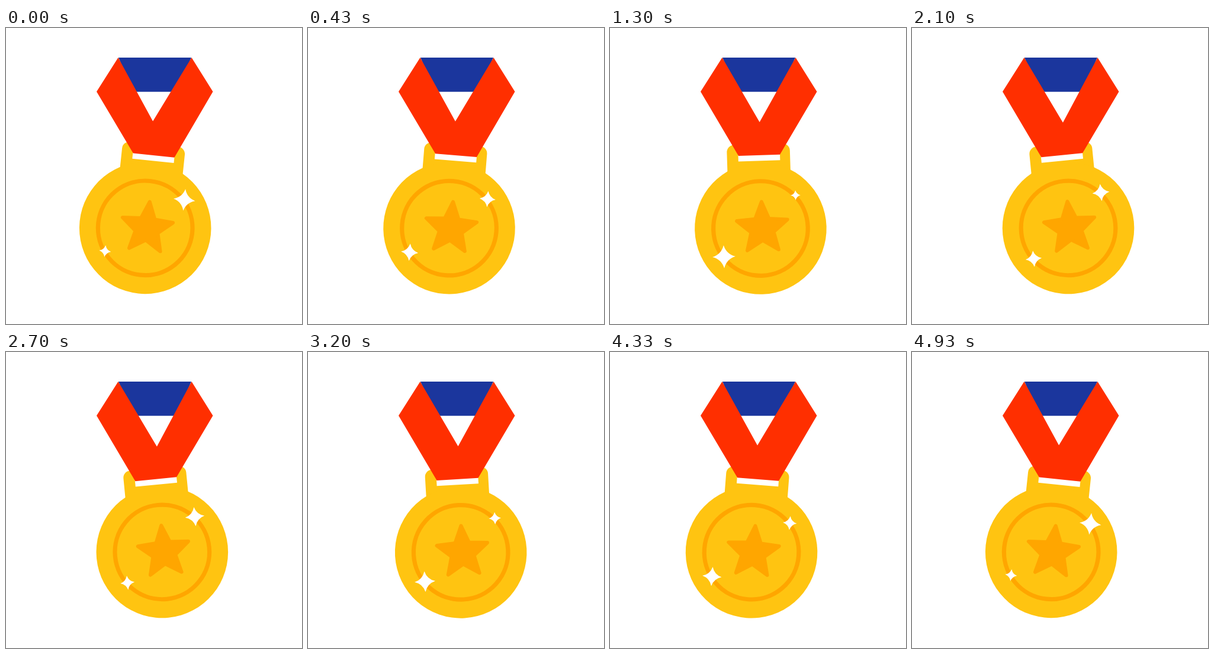
An HTML page that plays this animation: 500 by 500 pixels, repeating every 5.01 s.

```html
<!DOCTYPE html>
<html lang="en">
<head>
<meta charset="utf-8">
<title>Swinging medal</title>
<style>
  html, body { margin: 0; height: 100%; overflow: hidden; background: #fff; }
  svg { display: block; width: 100%; height: 100%; }
</style>
</head>
<body>
<svg viewBox="0 0 500 500">
  <defs>
    <path id="spark" fill="#fff" d="M0-1Q.22-.22 1 0Q.22.22 0 1Q-.22.22-1 0Q-.22-.22 0-1Z"/>
  </defs>
  <g id="medal">
    <rect x="197" y="196.5" width="106.5" height="70" rx="12" fill="#ffc411"/>
    <rect x="216" y="212" width="70.5" height="12.4" fill="#fff"/>
    <circle cx="250" cy="338.6" r="111.3" fill="#ffc411"/>
    <circle cx="250" cy="338.6" r="79.8" fill="none" stroke="#ffa600" stroke-width="7.2"/>
    <path id="star" transform="translate(252.9 338.8)" fill="#ffa600" stroke="#ffa600" stroke-width="6" stroke-linejoin="round"/>
    <use id="upper" href="#spark"/>
    <use id="lower" href="#spark"/>
  </g>
  <path d="M190 50H313L288 107.7H215Z" fill="#1b369d"/>
  <polygon id="ribbon" fill="#ff2f00"/>
</svg>
<script>
const $ = id => document.getElementById(id);
const LOOP = 5010, FRAMES = 99, TURN = 48;
const PIVOT = { x: 250, y: 197 }, SWING = 6;

const starPoints = Array.from({ length: 10 }, (_, i) => {
  const r = i % 2 ? 20 : 45, a = i * Math.PI / 5;
  return [r * Math.sin(a), -r * Math.cos(a)];
});
$('star').setAttribute('d', `M${starPoints.join('L')}Z`);

// Steps alternate between 30 ms and 70 ms
const stepAt = t => Math.min(FRAMES, 2 * Math.floor(t / 100) + (t % 100 >= 30 ? 1 : 0));

// -1 is the far left, 1 the far right; the way out is a little quicker at first
function swingAt(step) {
  if (step >= TURN) return Math.cos(Math.PI * (step - TURN) / (FRAMES - TURN));
  const u = step / TURN;
  return -Math.cos(Math.PI * (u + 0.055 * Math.sin(Math.PI * u)));
}

function rotate(x, y, degrees) {
  const a = degrees * Math.PI / 180, c = Math.cos(a), s = Math.sin(a);
  const dx = x - PIVOT.x, dy = y - PIVOT.y;
  return [PIVOT.x + dx * c - dy * s, PIVOT.y + dx * s + dy * c];
}

function place(id, x, y, size) {
  $(id).setAttribute('transform', `translate(${x} ${y}) scale(${size})`);
}

function draw(now) {
  const step = stepAt(now % LOOP);
  const swing = swingAt(step), angle = -SWING * swing;
  $('medal').setAttribute('transform', `rotate(${angle} ${PIVOT.x} ${PIVOT.y})`);

  const wave = Math.abs(Math.sin(2 * Math.PI * step / FRAMES));
  const glint = Math.min(1, 1.07 * wave ** 1.3);
  place('upper', 310.7, 284.4, 18.3 - 10 * glint);
  place('lower', 186.6, 384.5, 10 + 9.4 * glint);

  $('ribbon').setAttribute('points', [
    [189.5, 50], [153, 107.5],
    rotate(216.5, 215, angle), rotate(286.5, 215, angle),
    [349.5, 107.5], [313.5, 50],
    [251.6 + 3.5 * swing, 158.7 + 1.2 * swing]
  ].join(' '));
  requestAnimationFrame(draw);
}
requestAnimationFrame(draw);
</script>
</body>
</html>
```
